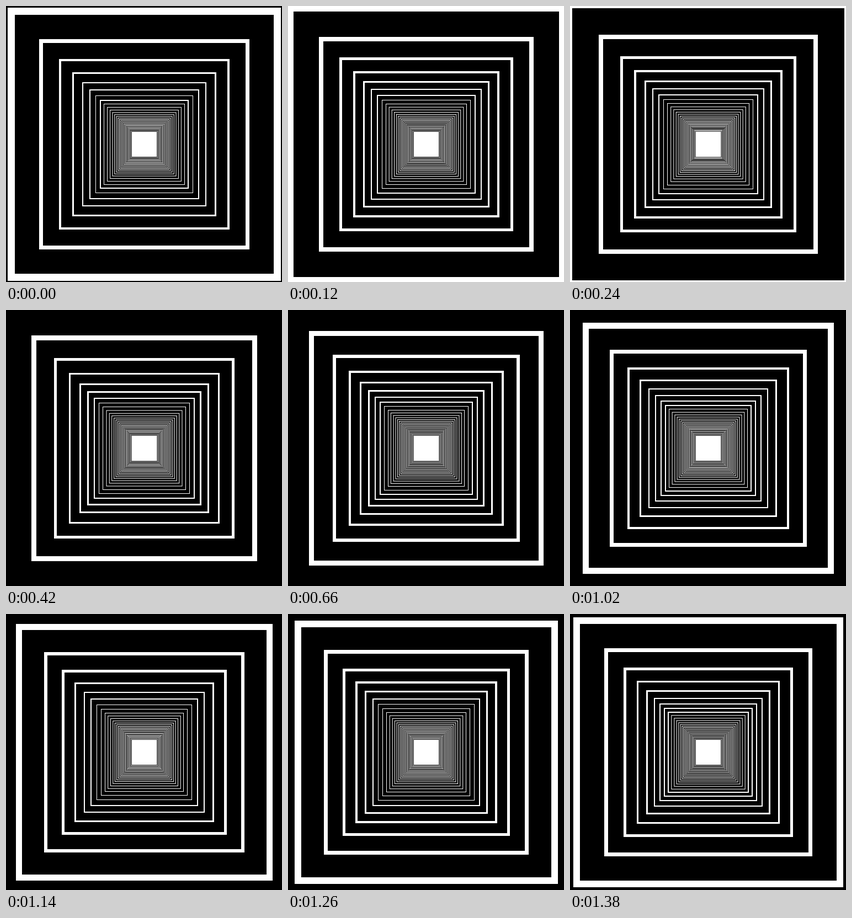
Animation, 500 px wide and 500 px high, one loop 1.44 s. Source, as an HTML page with a canvas:

```html
<!DOCTYPE html>
<html lang="en">
<head>
<meta charset="utf-8">
<title>Square tunnel</title>
<style>
  html, body { margin: 0; width: 100%; height: 100%; overflow: hidden; background: #000; }
  canvas { display: block; width: 500px; height: 500px; }
</style>
</head>
<body>
<canvas id="stage" width="500" height="500"></canvas>
<script>
  const ctx = document.getElementById('stage').getContext('2d');
  const SIZE = 500, MID = SIZE / 2;
  const STEP_MS = 60, STEPS = 24;
  const FOCAL = 826;      // half-size of a square at depth 1
  const NEAR = 3.347;     // depth of the nearest ring at the loop start
  const THICK = 0.178;    // ring thickness in depth units
  const FILL = 0.43;      // largest share of white among the far rings
  const CORE = 22.2;      // half-size of the white square at the far end

  // Adds a square whose last row and column of pixels are included.
  function square(half, snap) {
    const fit = snap ? Math.round : v => v;
    const from = fit(MID - half);
    const side = fit(MID + half) + 1 - from;
    ctx.rect(from, from, side, side);
  }

  function ring(depth) {
    const outer = FOCAL / depth;
    const width = outer - FOCAL / (depth + THICK);
    const gap = outer - FOCAL / (depth + 1);
    const snap = width >= 1;
    // Far rings are at most one soft pixel wide, so the centre stays grey.
    const line = snap ? width : Math.max(width, Math.min(1, gap * FILL));
    ctx.beginPath();
    square(outer, snap);
    square(outer - line, snap);
    ctx.fill('evenodd');
  }

  function draw(step) {
    ctx.globalCompositeOperation = 'source-over';
    ctx.fillStyle = '#000';
    ctx.fillRect(0, 0, SIZE, SIZE);

    ctx.globalCompositeOperation = 'lighter';
    ctx.fillStyle = '#fff';
    for (let depth = NEAR - step / STEPS; FOCAL / depth > CORE; depth++) ring(depth);
    ctx.beginPath();
    square(CORE, true);
    ctx.fill();
  }

  let shown = -1;
  function tick() {
    const step = Math.floor(performance.now() / STEP_MS) % STEPS;
    if (step !== shown) draw(shown = step);
    requestAnimationFrame(tick);
  }
  tick();
</script>
</body>
</html>
```
